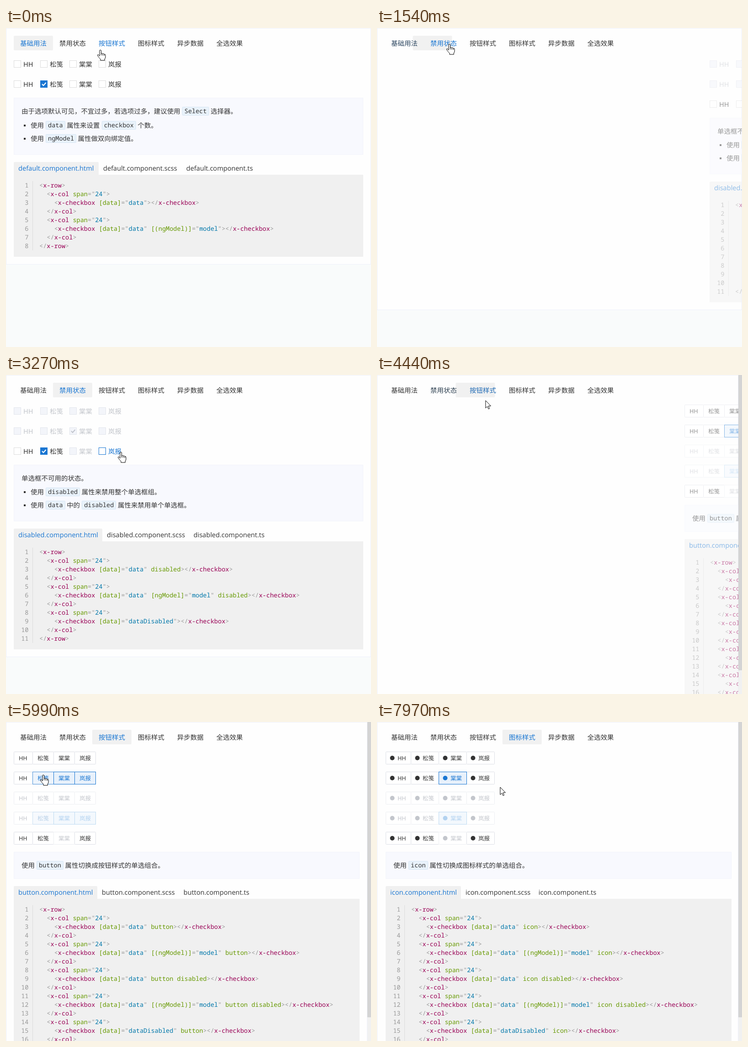
These frames come from a looping animation (800 px wide and 700 px high, 8 s). An HTML page:

```html
<!DOCTYPE html>
<html lang="zh">
<head>
<meta charset="utf-8">
<title>Checkbox</title>
<style>
  html, body { margin: 0; width: 100%; height: 100%; overflow: hidden; background: #f9fbfb; }
  svg { display: block; width: 800px; height: 700px; }
  text { white-space: pre; text-rendering: geometricPrecision; fill: #333;
    font: 14.5px "Noto Sans", "Noto Sans CJK SC", "Noto Sans CJK", sans-serif; }
  text.small { font-size: 12.6px; }
  text.file { font: 14.6px "Open Sans", "Noto Sans", sans-serif; }
  text.mono { font: 13.6px "Noto Sans Mono", monospace; }
  .punct { fill: #999; }
  .tag { fill: #905; }
  .attr { fill: #690; }
  .val { fill: #07a; }
</style>
</head>
<body>
<svg id="stage" viewBox="0 0 800 700"></svg>
<script>
const LOOP = 8000, BLUE = [25, 118, 210], INK = [51, 51, 51];
const TABS = ['基础用法', '禁用状态', '按钮样式', '图标样式', '异步数据', '全选效果'];
const NAMES = ['HH', '松笺', '棠棠', '岚报'];
const EDGES = {
  check: [17, 75, 139, 203],
  button: [17, 58, 104, 150, 196],
  icon: [17, 72, 133, 194, 255]
};
const ALWAYS = -9999, ALL = [0, 1, 2, 3];
const row = (on = {}, off = []) => ({ on, off });

// numbers in "on" are the moments of the clicks
const model = { 1: 5880, 2: ALWAYS, 3: 5320 };
const styled = word => [
  `[data]="data" ${word}`,
  `[data]="data" [(ngModel)]="model" ${word}`,
  `[data]="data" ${word} disabled`,
  `[data]="data" [(ngModel)]="model" ${word} disabled`,
  `[data]="dataDisabled" ${word}`
];
const PANELS = [
  { name: 'default', kind: 'check', files: [213, 395], infoH: 125, gap: 60,
    rows: [row(), row({ 1: ALWAYS })],
    info: ['由于选项默认可见\uff0c不宜过多\uff0c若选项过多\uff0c建议使用|Select|选择器。',
      '使用|data|属性来设置|checkbox|个数。', '使用|ngModel|属性做双向绑定值。'],
    attrs: ['[data]="data"', '[data]="data" [(ngModel)]="model"'] },
  { name: 'disabled', kind: 'check', files: [221, 411], infoH: 124, gap: 59,
    rows: [row({}, ALL), row({ 2: ALWAYS }, ALL), row({ 1: 2640 }, [2])],
    info: ['单选框不可用的状态。', '使用|disabled|属性来禁用整个单选框组。',
      '使用|data|中的|disabled|属性来禁用单个单选框。'],
    attrs: ['[data]="data" disabled', '[data]="data" [ngModel]="model" disabled', '[data]="dataDisabled"'] },
  { name: 'button', kind: 'button', files: [210, 389], infoH: 59, tall: true,
    rows: [row({ 1: 6480, 2: 6690, 3: 6890 }), row(model), row({}, ALL), row(model, ALL), row({}, [2])],
    info: ['使用|button|属性切换成按钮样式的单选组合。'], attrs: styled('button') },
  { name: 'icon', kind: 'icon', files: [192, 352], infoH: 59, tall: true,
    rows: [row(), row({ 2: ALWAYS }), row({}, ALL), row({ 2: ALWAYS }, ALL), row({}, [2])],
    info: ['使用|icon|属性切换成图标样式的单选组合。'], attrs: styled('icon') }
];
const SWITCHES = [1352, 4232, 7548], LEAVE = 133, SLIDE = 300;
const PATH = [
  [0, 207, 48], [70, 207, 48], [450, 192, 58], [840, 177, 63], [940, 177, 63], [1160, 159, 35],
  [1940, 159, 35], [2250, 118, 105], [2560, 84, 167], [2890, 84, 167], [3090, 215, 167],
  [3270, 252, 169], [3560, 252, 170], [3680, 256, 182], [3890, 256, 182], [4150, 228, 37],
  [4290, 228, 37], [4440, 238, 56], [4680, 222, 110], [4740, 222, 110], [5200, 176, 121],
  [5400, 174, 121], [5530, 160, 120], [5620, 160, 120], [5850, 82, 116], [6100, 82, 116],
  [6390, 82, 80], [6560, 84, 78], [6660, 126, 78], [6780, 126, 78], [6860, 172, 78],
  [6960, 172, 78], [7100, 300, 64], [7165, 333, 51], [7200, 339, 35], [7620, 339, 35], [7970, 270, 143]
];

const stage = document.getElementById('stage');
function el(parent, tag, attrs = {}, text) {
  const node = document.createElementNS('http://www.w3.org/2000/svg', tag);
  for (const k in attrs) node.setAttribute(k, attrs[k]);
  if (text !== undefined) node.textContent = text;
  return parent.appendChild(node);
}
const rect = (p, x, y, width, height, fill, more) => el(p, 'rect', { x, y, width, height, fill, ...more });
const clamp = v => Math.min(1, Math.max(0, v));
const mix = (a, b, k) => `rgb(${a.map((v, i) => Math.round(v + (b[i] - v) * k))})`;

// cubic-bezier(.42, 0, .58, 1)
function ease(x) {
  x = clamp(x);
  let lo = 0, hi = 1;
  for (let i = 0; i < 20; i++) {
    const s = (lo + hi) / 2, r = 1 - s;
    if (1.26 * s * r * r + 1.74 * s * s * r + s * s * s < x) lo = s; else hi = s;
  }
  return lo * lo * (3 - 2 * lo);
}

function infoLine(g, line, x, y) {
  line.split('|').forEach((part, i) => {
    if (i % 2) {
      const w = part.length * 8.16 + 10;
      rect(g, Math.round(x + 4) + .5, y - 8.5, Math.round(w) - 1, 18, '#e9f2fb', { stroke: '#d6e6f3', rx: 1 });
      el(g, 'text', { x: x + 9, y: y + 5, class: 'mono' }, part);
      x += w + 7.5;
    } else {
      el(g, 'text', { x, y: y + 5.5 }, part);
      x += part.length * 14.5;
    }
  });
}

function codeLine(g, line, x, y) {
  const text = el(g, 'text', { x, y, class: 'mono' });
  const add = (cls, s) => el(text, 'tspan', { class: cls }, s);
  const re = /(<\/?)([\w-]+)|"([^"]*)"|([>=])|([^\s<>="]+)|\s+/g;
  for (const [all, open, tag, val, mark, attr] of line.matchAll(re)) {
    if (open) { add('punct', open); add('tag', tag); }
    else if (val) { add('punct', '"'); add('val', val); add('punct', '"'); }
    else add(mark ? 'punct' : attr ? 'attr' : '', all);
  }
}

function buildCheck(g, x, y, name, off) {
  const box = rect(g, x + .5, y - 7.5, 15, 15, off ? '#f3f5fa' : '#fff', { stroke: off ? '#e2e5ec' : '#dcdcdc' });
  const fill = rect(g, x, y - 8, 16, 16, off ? 'none' : '#1976d2');
  const tick = el(g, 'path', { d: `M${x + 4} ${y}l3 3.2 5.5-6.2`, fill: 'none',
    stroke: off ? '#c0c4cc' : '#fff', 'stroke-width': 2 });
  const label = el(g, 'text', { x: x + 21, y: y + 5.5 }, name);
  if (off) label.style.fill = '#c3c6cc';
  return (hover, on) => {
    fill.setAttribute('opacity', on);
    tick.setAttribute('opacity', on);
    if (off) return;
    box.setAttribute('stroke', mix([220, 220, 220], BLUE, Math.max(hover, on)));
    label.style.fill = mix(INK, BLUE, hover);
  };
}

function buildButton(g, x, w, y, name, off, icon, top) {
  rect(g, x + .5, y - 13.5, w, 27, '#fff', { stroke: off ? '#eceef2' : '#dcdfe6', rx: 1 });
  const fill = rect(top, x + .5, y - 13.5, w, 27, off ? '#f3f8fd' : '#e8f1fb',
    { stroke: off ? '#bddaf2' : '#1976d2' });
  const dot = icon && el(top, 'circle', { cx: x + 14.5, cy: y, r: 5 });
  const label = el(top, 'text', { x: x + (icon ? 26 : 11), y: y + 4.6, class: 'small' }, name);
  return (hover, on) => {
    fill.setAttribute('opacity', on);
    const ink = off ? mix([195, 198, 204], [178, 210, 240], on) : mix(INK, BLUE, Math.max(hover, on));
    label.style.fill = ink;
    if (dot) dot.style.fill = ink;
  };
}

function buildPanel(p, parent) {
  const g = p.g = el(parent, 'g');
  const width = p.width = p.tall ? 758 : 766;
  const edges = EDGES[p.kind];
  p.items = [];
  p.rows.forEach((r, i) => {
    const y = 79 + 44 * i, base = el(g, 'g'), top = el(g, 'g');
    NAMES.forEach((name, j) => {
      const x = edges[j], off = r.off.includes(j), plain = p.kind === 'check';
      const w = plain ? (j ? 50 : 44) : edges[j + 1] - x;
      const draw = plain ? buildCheck(g, x, y, name, off)
        : buildButton(base, x, w, y, name, off, p.kind === 'icon', top);
      const h = plain ? 10 : 14;
      p.items.push({ draw, on: r.on[j],
        hit: ([px, py]) => !off && px >= x && px < x + w && Math.abs(py - y) <= h });
    });
  });

  const infoY = 65 + 44 * p.rows.length;
  rect(g, 17.5, infoY + .5, width - 1, p.infoH - 1, '#f8f9fe', { stroke: '#f2f4fb' });
  p.info.forEach((line, i) => {
    const y = infoY + (i ? p.gap + 29 * (i - 1) : 29);
    if (i) rect(g, 39, y - 1, 4, 4, '#333');
    infoLine(g, line, i ? 54 : 34, y);
  });

  const head = infoY + p.infoH + 16;
  const lines = ['<x-row>'];
  for (const a of p.attrs) lines.push('  <x-col span="24">', `    <x-checkbox ${a}></x-checkbox>`, '  </x-col>');
  lines.push('</x-row>');
  const codeH = lines.length * 19;
  rect(g, 17, head, p.files[0] - 27, 30, '#f0f0f0', { rx: 2 });
  rect(g, 17, head + 28, width, codeH + 28, '#f0f0f0', { rx: 1 });
  ['html', 'scss', 'ts'].forEach((ext, i) => {
    const file = el(g, 'text', { x: i ? p.files[i - 1] : 27, y: head + 19, class: 'file' }, `${p.name}.component.${ext}`);
    if (!i) file.style.fill = '#1976d2';
  });
  rect(g, 58, head + 42, 1, codeH, '#dcdcdc');
  lines.forEach((line, i) => {
    const y = head + 56 + 19 * i;
    el(g, 'text', { x: 49.5, y, class: 'mono punct', 'text-anchor': 'end' }, i + 1);
    codeLine(g, line, 73, y);
  });
  p.bottom = head + codeH + 72;
}

rect(stage, 0, 0, 800, 700, '#f9fbfb');
const card = rect(stage, .5, .5, 799, 518, '#fefefe', { stroke: '#eef0fa' });
const bar = rect(stage, 17, 17, 86, 32, '#f1f1f1', { rx: 2 });
const tabs = TABS.map((name, i) => ({
  label: el(stage, 'text', { x: 31 + 86 * i, y: 38.5 }, name),
  hit: ([x, y]) => x >= 17 + 86 * i && x < 103 + 86 * i && y >= 17 && y < 49
}));
for (const p of PANELS) buildPanel(p, stage);
const scroll = el(stage, 'g');
rect(scroll, 792, 0, 8, 700, '#f1f1f1');
rect(scroll, 792, 0, 8, 648, '#d4d4d4', { rx: 1 });
const cursor = el(stage, 'g', { stroke: '#000', fill: '#fff', 'stroke-linejoin': 'round' });
const arrow = el(cursor, 'path', { d: 'M0 0V16.5L3.8 13L6.3 18.7L8.7 17.7L6.2 12H11.5Z' });
const hand = el(cursor, 'path', {
  d: 'M-2 13.5V2Q-2 .2-.2 .2T1.6 2V8Q3.5 6.6 4.9 8.5Q6.8 7.3 8.2 9.4Q11 8.8 11 12V16Q11 18 9.3 20V23H0V20.5' +
    'Q-1 19-3.5 16.5L-6.3 12.5Q-7 10.4-4.8 10.5Q-3.3 11-2 13.5ZM1.6 8V12M4.9 9V12.5M8.2 10V13' });

function pointer(t) {
  const i = PATH.findIndex(k => k[0] > t);
  if (i < 1) return (i ? PATH[PATH.length - 1] : PATH[0]).slice(1);
  const [a, b] = [PATH[i - 1], PATH[i]];
  const u = (t - a[0]) / (b[0] - a[0]), k = u * u * (3 - 2 * u);
  return [a[1] + (b[1] - a[1]) * k, a[2] + (b[2] - a[2]) * k];
}

function render(t) {
  // hover fades over 150 ms: the share of recent moments spent over the part
  const trail = Array.from({ length: 10 }, (_, k) => pointer(Math.max(0, t - 15 * k)));
  const hovered = part => trail.filter(part.hit).length / trail.length;

  const moved = SWITCHES.map(s => ease((t - s) / SLIDE));
  const place = moved.reduce((a, b) => a + b, 0);
  bar.setAttribute('x', 17 + 86 * place);
  tabs.forEach((tab, i) => {
    const active = clamp(1 - Math.abs(place - i));
    tab.label.style.fill = mix(INK, BLUE, Math.max(active, hovered(tab)));
  });

  const now = SWITCHES.filter(s => t >= s + LEAVE).length;
  const panel = PANELS[now];
  const enter = now ? ease((t - SWITCHES[now - 1] - LEAVE) / SLIDE) : 1;
  const leave = now < SWITCHES.length ? clamp((t - SWITCHES[now]) / LEAVE) : 0;
  PANELS.forEach(p => p.g.setAttribute('display', p === panel ? 'inline' : 'none'));
  panel.g.setAttribute('transform', `translate(${Math.round(panel.width * (1 - enter))} 0)`);
  panel.g.setAttribute('opacity', (.45 + .55 * enter) * (1 - leave));
  for (const item of panel.items) {
    item.draw(hovered(item), item.on === undefined ? 0 : clamp((t - item.on) / 150));
  }
  card.setAttribute('height', panel.bottom);
  card.setAttribute('width', panel.tall ? 791 : 799);
  scroll.setAttribute('display', panel.tall ? 'inline' : 'none');

  const over = [...tabs, ...panel.items].some(part => part.hit(trail[0]));
  hand.setAttribute('display', over ? 'inline' : 'none');
  arrow.setAttribute('display', over ? 'none' : 'inline');
  cursor.setAttribute('transform', `translate(${trail[0].map(Math.round)})`);
}

const start = performance.now();
function tick() {
  render((performance.now() - start) % LOOP);
  requestAnimationFrame(tick);
}
tick();
</script>
</body>
</html>
```
